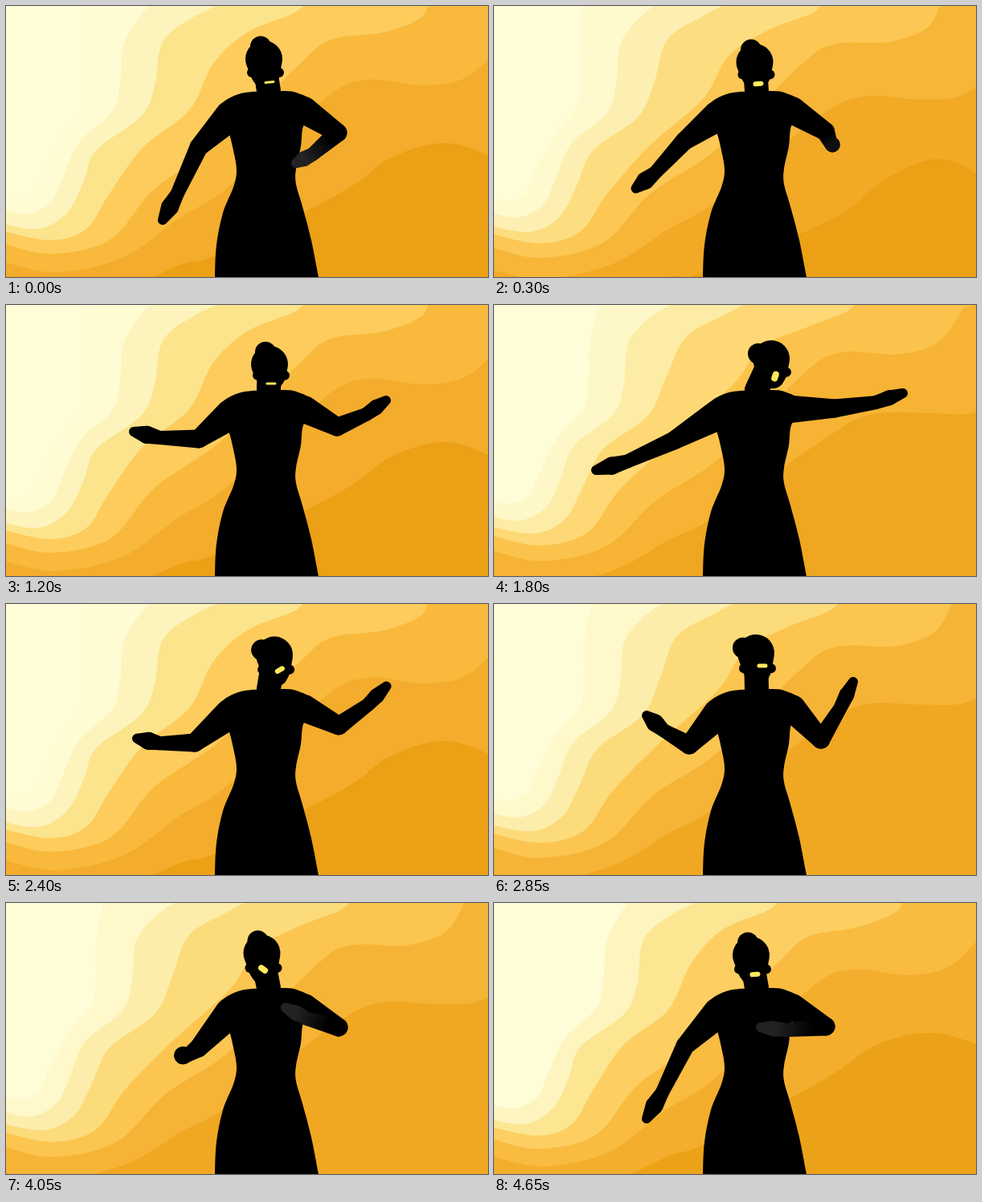
An HTML page with a canvas for the animation above (4800 ms loop, 600 by 338 pixels).

```html
<!DOCTYPE html>
<html>
<head>
<meta charset="utf-8">
<style>
html, body { margin: 0; width: 100%; height: 100%; overflow: hidden; background: #fffcd8; }
canvas { display: block; }
</style>
</head>
<body>
<canvas id="stage" width="600" height="338"></canvas>
<script>
const ctx = document.getElementById('stage').getContext('2d');
const STEP = 150, STEPS = 32, WAVE_STEPS = 8;

const mix = (a, b, k) => a.map((v, i) => v + (b[i] - v) * k);
const clamp = (v, lo, hi) => Math.max(lo, Math.min(hi, v));

// Key points of the wave edges; each edge drifts into the next one.
const edges = [
  [190,-10, 165,15, 146,50, 142,95, 132,132, 92,169, 70,215, 56,245, 25,259, -10,251],
  [285,-10, 233,14, 195,45, 185,100, 168,138, 112,180, 97,218, 76,258, 40,278, -10,270],
  [374,-10, 360,8, 300,33, 258,72, 228,130, 170,177, 128,235, 100,278, 55,292, -10,279],
  [526,-10, 517,14, 470,33, 405,42, 366,72, 270,168, 185,228, 130,291, 55,309, -10,294],
  [625,40, 575,88, 520,99, 450,92, 395,117, 275,227, 215,265, 145,314, 60,332, -10,317],
  [640,215, 600,187, 545,171, 480,189, 415,234, 262,310, 220,322, 150,350, 60,368, -10,368]
];
edges.unshift(mix(edges[1], edges[0], 2));
edges.push(mix(edges[5], edges[6], 2));
const shades = ['fffbd3', 'fdf3bd', 'fce48c', 'fdcc5c', 'f8b93c', 'f3ac2b', 'eba015']
  .map(h => [0, 2, 4].map(i => parseInt(h.slice(i, i + 2), 16)));

// head: x, y, bun offset; mouth: x, y, opening, angle; arms: elbow, fingertips
const poses = [
  { at: 0, head: [321,66,-4], mouth: [328,95,3,-.1], left: [240,176, 195,267], right: [413,158, 361,196] },
  { at: 4, head: [328,74,-5], mouth: [330,99,9,-.1], left: [234,161, 158,188], right: [412,155, 486,153] },
  { at: 8, head: [328,74,-5], mouth: [330,98,3,0], left: [240,167, 159,158], right: [412,152, 473,119] },
  { at: 12, head: [345,67,-16], mouth: [350,89,8,-1.25], left: [224,169, 127,206], right: [424,129, 509,110] },
  { at: 19, head: [326,61,-16], mouth: [334,77,5,0], left: [243,176, 190,139], right: [407,169, 447,97] },
  { at: 23, head: [317,60,-6], mouth: [315,76,9,1.3], left: [241,184, 241,111], right: [415,156, 364,106] },
  { at: 31, head: [320,65,-4], mouth: [325,89,6,-.1], left: [238,178, 190,269], right: [413,154, 332,155] }
];

function poseAt(step) {
  const i = poses.findLastIndex(p => p.at <= step);
  const a = poses[i], b = poses[i + 1] || { ...poses[0], at: STEPS };
  const k = (step - a.at) / (b.at - a.at);
  const part = name => mix(a[name], b[name], k);
  return { head: part('head'), mouth: part('mouth'), left: part('left'), right: part('right') };
}

// Value at k between b and c on a smooth path through a, b, c, d.
const glide = (a, b, c, d, k) =>
  b + k / 2 * (c - a + k * (2 * a - 5 * b + 4 * c - d + k * (3 * (b - c) + d - a)));

function edgeAt(u) {
  const i = Math.floor(u);
  const [a, b, c, d] = [-1, 0, 1, 2].map(n => edges[clamp(i + n, 0, edges.length - 1)]);
  return b.map((v, n) => glide(a[n], v, c[n], d[n], u - i));
}

// Smooth curve through flat x,y points.
function curve(p, closed) {
  const n = p.length / 2;
  const at = i => {
    const j = closed ? (i + n) % n : clamp(i, 0, n - 1);
    return [p[2 * j], p[2 * j + 1]];
  };
  ctx.beginPath();
  ctx.moveTo(...at(0));
  for (let i = 0; i < (closed ? n : n - 1); i++) {
    const [a, b, c, d] = [at(i - 1), at(i), at(i + 1), at(i + 2)];
    ctx.bezierCurveTo(b[0] + (c[0] - a[0]) / 6, b[1] + (c[1] - a[1]) / 6,
      c[0] - (d[0] - b[0]) / 6, c[1] - (d[1] - b[1]) / 6, c[0], c[1]);
  }
}

function disc(x, y, r) {
  ctx.beginPath();
  ctx.arc(x, y, r, 0, 7);
  ctx.fill();
}

// Two circles joined by their outer tangents.
function taper(x1, y1, r1, x2, y2, r2) {
  const d = Math.hypot(x2 - x1, y2 - y1);
  if (d <= Math.abs(r1 - r2)) return r1 > r2 ? disc(x1, y1, r1) : disc(x2, y2, r2);
  const a = Math.atan2(y2 - y1, x2 - x1), o = Math.acos((r1 - r2) / d);
  ctx.beginPath();
  ctx.arc(x1, y1, r1, a + o, a - o + 2 * Math.PI);
  ctx.arc(x2, y2, r2, a - o, a + o);
  ctx.fill();
}

function drawWaves(phase) {
  ctx.fillStyle = '#fffcd8';
  ctx.fillRect(0, 0, 600, 338);
  for (let u = phase; u < 6.3; u++) {
    const i = Math.floor(u);
    const rgb = mix(shades[i], shades[Math.min(i + 1, 6)], u - i);
    ctx.fillStyle = `rgb(${rgb.map(Math.round)})`;
    curve(edgeAt(u));
    ctx.lineTo(-20, 420);
    ctx.lineTo(720, 420);
    ctx.lineTo(720, -40);
    ctx.fill();
  }
}

// side is 1 for the left arm and -1 for the right one.
function drawArm(sx, sy, sr, [ex, ey, tx, ty], side, palm) {
  ctx.fillStyle = '#000';
  taper(sx, sy, sr, ex, ey, 11.5);
  // A hand turned in towards the body catches some light.
  const glow = clamp(1 + side * (tx - ex) / 20, 0, 1);
  const skin = ctx.createLinearGradient(ex, ey, tx, ty);
  skin.addColorStop(.2, '#000');
  skin.addColorStop(.8, `rgb(${[35, 35, 38].map(v => Math.round(v * glow))})`);
  ctx.fillStyle = skin;
  const [wx, wy] = mix([ex, ey + 4], [tx, ty + 4], .6);
  const [px, py] = mix([wx, wy], [tx, ty], .5);
  taper(ex, ey, 11.5, wx, wy, 8.5);
  taper(wx, wy, 8.5, px, py, palm);
  taper(px, py, palm, tx, ty, 6);
}

function drawHead([x, y, turn], [mx, my, open, angle]) {
  const drop = (106 - y) * .57;
  ctx.fillStyle = '#000';
  disc(x + turn, y - Math.sqrt(18 * 18 - turn * turn) + 2, 13);
  taper(x, y, 23, x + 1.5, y + drop * .7, 18.5);
  taper(x + 1.5, y + drop * .7, 18.5, x + 2, y + drop, 15);
  taper(x, y, 15, 327, 106, 15);
  for (const s of [-1, 1]) disc(x + 2 + s * 17, y + drop * .75, 6);

  const reach = (13 - open) / 2;
  const dx = Math.cos(angle) * reach, dy = Math.sin(angle) * reach;
  ctx.strokeStyle = '#ffe95c';
  ctx.lineWidth = open;
  ctx.lineCap = 'round';
  ctx.beginPath();
  ctx.moveTo(mx - dx, my - dy);
  ctx.lineTo(mx + dx, my + dy);
  ctx.stroke();
}

function drawFigure({ head, mouth, left, right }) {
  ctx.fillStyle = '#000';
  curve([306,107, 284,112, 268,123, 268,140, 277,157, 283,180, 287,205, 283,226,
    270,258, 262,298, 260,338, 260,360, 394,360, 389,338, 380,292, 369,250, 361,222,
    361,203, 367,175, 370,150, 382,132, 379,117, 364,109, 348,106], true);
  ctx.fill();
  drawHead(head, mouth);
  drawArm(279, 137, 19, left, 1, 11);
  drawArm(371, 130, 17, right, -1, 9.5);
}

function frame() {
  const step = Math.floor(performance.now() / STEP) % STEPS;
  drawWaves(step % WAVE_STEPS / WAVE_STEPS);
  drawFigure(poseAt(step));
  requestAnimationFrame(frame);
}
frame();
</script>
</body>
</html>
```
